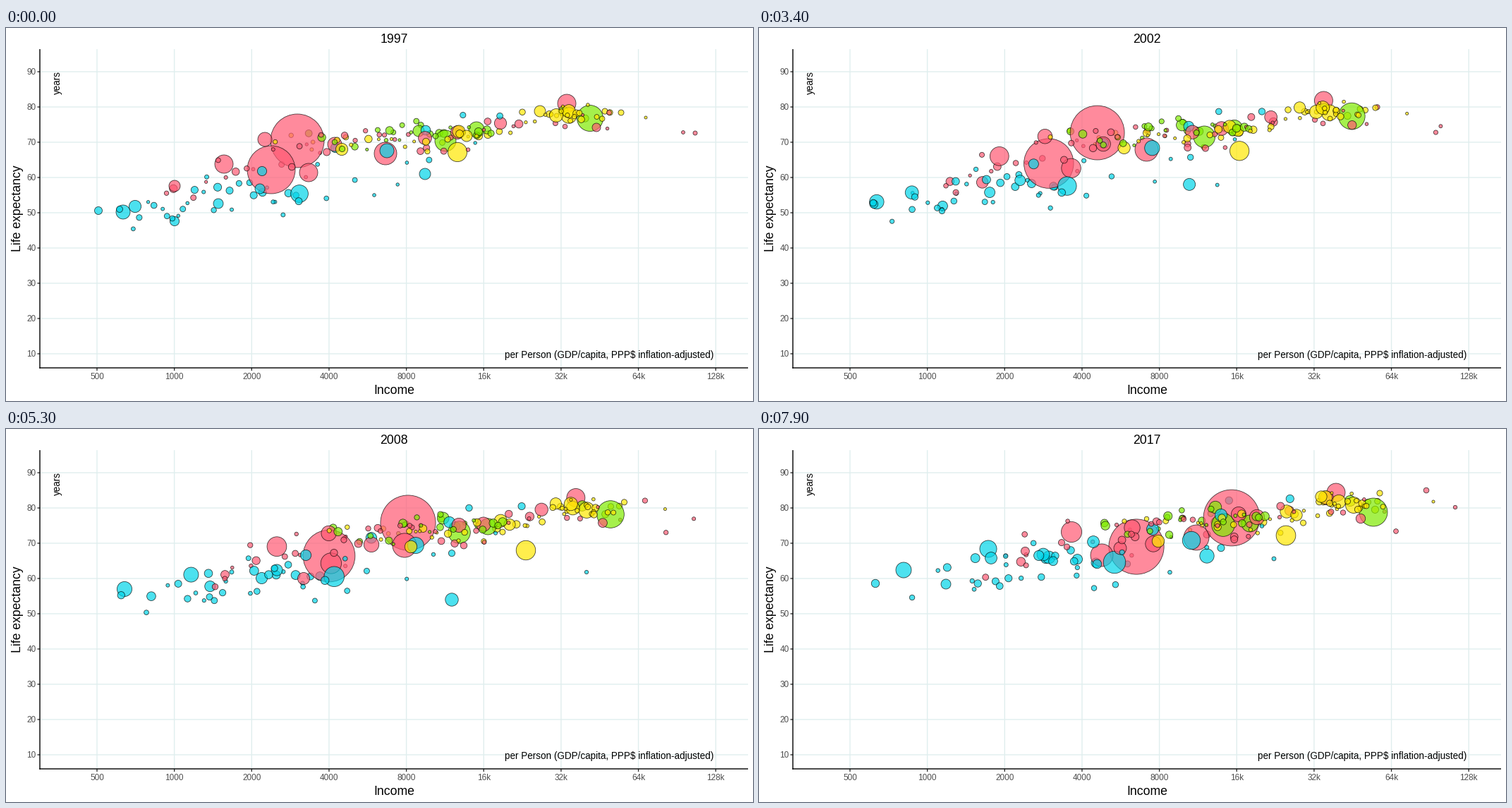
Recreate the animation shown at these times as a matplotlib script. Size 1059x529 px, loop 10000 ms.

```python
import matplotlib.pyplot as plt
import numpy as np
from matplotlib.animation import FuncAnimation
from matplotlib.patches import Circle

W, H, DPI = 1059, 529, 100
FRAMES, HOLD, STEPS, MID = 100, 20, 59, 33
PX = 72 / DPI
CYAN, GREEN, RED, YELLOW = "#00d5e9", "#7feb00", "#ff5872", "#ffe700"
GROWTH = {CYAN: 1.27, GREEN: 1.09, RED: 1.12, YELLOW: 1.02}

rng = np.random.default_rng(7)
plt.rcParams["font.family"] = "Liberation Sans"
fig = plt.figure(figsize=(W / DPI, H / DPI), dpi=DPI, facecolor="white")
ax = fig.add_axes([0, 0, 1, 1])
ax.set(xlim=(0, W), ylim=(H, 0))
ax.axis("off")


def line(xs, ys, color, z, width=1.4):
    ax.plot(xs, ys, color=color, lw=width * PX, zorder=z,
            solid_capstyle="butt", snap=False)


def label(x, y, s, size, color="black", ha="center", rot=0):
    return ax.text(x, y, s, fontsize=size * PX, color=color, ha=ha, va="baseline",
                   rotation=rot, rotation_mode="anchor", zorder=9)


def draw_axes():
    names = ("500", "1000", "2000", "4000", "8000", "16k", "32k", "64k", "128k")
    for i, name in enumerate(names):
        x = 129 + 109.65 * i
        line((x, x), (30, 482), "#e0eeee", 1)
        line((x, x), (482, 486), "#333333", 2)
        label(x, 498.5, name, 11.8, "#4d4d4d")
    for v in range(10, 100, 10):
        y = 512 - 5 * v
        line((48, 1052), (y, y), "#e0eeee", 1)
        line((44.5, 48), (y, y), "#333333", 2)
        label(42.5, y + 4.5, str(v), 11.8, "#4d4d4d", "right")
    line((48, 48), (30, 482.8), "black", 3)
    line((47.3, 1052), (482, 482), "black", 3)
    label(550, 519, "Income", 17.6)
    label(21, 256, "Life expectancy", 17.6, rot=90)
    label(77, 78, "years", 13.56, rot=90)
    label(1003, 468, "per Person (GDP/capita, PPP$ inflation-adjusted)", 13.56, ha="right")


bubbles = []


def bubble(color, r, start, end, mid=None, growth=None, sway=0, z=5):
    """Add one bubble going from start to end, through mid if it is given."""
    dot = Circle(start, r, fc=color + "b3", ec=(0, 0, 0, 0.75), lw=0.8 * PX, zorder=z)
    ax.add_patch(dot)
    way = np.array([start, mid, end] if mid else [start, end])
    knots = (0, MID, STEPS) if mid else (0, STEPS)
    bubbles.append((dot, knots, way, r, growth or GROWTH[color], sway, rng.integers(2, 6)))


def swarm(color, count, xs, ys, spread, travel, rise, rmax):
    """Scatter small bubbles along the line xs, ys; poorer ones travel further."""
    u = (np.arange(count) + rng.random(count)) / count
    for x in np.interp(u, np.linspace(0, 1, len(xs)), xs):
        y = np.interp(x, xs, ys) + rng.normal(0, spread)
        dx = travel * (1 - x / 1000) * rng.uniform(0.4, 1.6)
        dy = rise * rng.uniform(0.8, 1.2)
        r = 2 + (rmax - 2) * rng.random() ** 1.3
        bubble(color, r, (x, y), (x + dx, y - dy),
               sway=rng.uniform(-4, 4), z=rng.uniform(4.6, 6))


def add_swarms():
    swarm(CYAN, 28, (180, 240, 300, 365, 420), (272, 258, 235, 228, 238), 17, 95, 48, 6)
    swarm(CYAN, 9, (400, 540, 610, 730), (215, 230, 180, 150), 18, 110, 22, 5)
    swarm(RED, 14, (216, 300, 370, 450), (240, 205, 200, 195), 14, 140, 35, 6)
    swarm(RED, 24, (400, 500, 590, 700, 860), (175, 158, 165, 140, 128), 12, 150, 22, 6)
    swarm(GREEN, 27, (415, 530, 580, 640, 690), (165, 158, 140, 145, 147), 9, 120, 20, 6)
    swarm(YELLOW, 22, (380, 480, 570, 640, 700), (168, 160, 162, 158, 148), 7, 260, 26, 5.5)
    swarm(YELLOW, 22, (715, 770, 800, 820, 860), (135, 122, 122, 123, 118), 6, 190, 17, 5)


def add_giants():
    bubble(RED, 13, (309, 193), (443, 146), growth=1.12)
    bubble(RED, 38, (413, 160), (670, 126), (570, 133), growth=1.05)
    bubble(RED, 34, (376, 201), (535, 167), (458, 180), growth=1.15)
    bubble(RED, 16, (538, 178), (620, 154), (565, 165))
    bubble(RED, 13, (795, 107), (818, 90), growth=1)
    bubble(RED, 13, (429, 205), (486, 179), growth=1.23)
    bubble(GREEN, 18.5, (828, 128), (871, 118), (857, 121), growth=1.08)
    bubble(GREEN, 15, (623, 160), (658, 136))
    bubble(GREEN, 11, (667, 144), (696, 134))
    bubble(GREEN, 8, (585, 146), (647, 111))
    bubble(GREEN, 7, (790, 118), (838, 102))
    bubble(YELLOW, 13.6, (640, 176), (747, 151), (737, 172))


def add_large():
    bubble(CYAN, 10, (540, 174), (613, 158))
    bubble(CYAN, 10, (166, 261), (205, 200), (168, 227), growth=1.1)
    bubble(CYAN, 8.6, (183, 253), (325, 170), growth=1.4)
    bubble(CYAN, 12.4, (416, 235), (504, 189))
    bubble(CYAN, 8, (594, 207), (635, 180), (632, 242))
    bubble(CYAN, 7, (301, 249), (411, 182))
    bubble(CYAN, 7, (360, 228), (403, 178))
    bubble(CYAN, 6.6, (363, 203), (474, 160))
    bubble(CYAN, 6.6, (239, 274), (329, 183))
    bubble(CYAN, 6.7, (467, 170), (558, 142))
    bubble(CYAN, 6.8, (595, 145), (655, 122))
    bubble(CYAN, 5.5, (131, 259), (265, 220))
    bubble(CYAN, 4.5, (161, 257), (165, 219))
    bubble(CYAN, 2.3, (522, 237), (730, 184), (823, 203))
    bubble(RED, 10, (466, 165), (559, 163))
    bubble(RED, 9.5, (640, 148), (706, 125))
    bubble(RED, 9.4, (594, 156), (680, 121))
    bubble(RED, 10, (367, 158), (529, 140))
    bubble(RED, 8.6, (701, 135), (805, 98))
    bubble(RED, 8, (239, 224), (512, 169), (422, 212))
    bubble(RED, 6, (837, 141), (853, 127))
    bubble(RED, 3, (977, 149), (903, 145))
    bubble(RED, 2.4, (960, 148), (987, 111))
    bubble(RED, 3.4, (855, 120), (946, 87))
    bubble(YELLOW, 11.2, (798, 124), (843, 108))
    bubble(YELLOW, 9.5, (780, 124), (822, 103))
    bubble(YELLOW, 9.4, (798, 118), (803, 97))
    bubble(YELLOW, 9, (642, 147), (748, 117))
    bubble(YELLOW, 8.6, (476, 172), (566, 159), (574, 167))
    bubble(YELLOW, 8, (653, 153), (762, 122))
    bubble(YELLOW, 8, (757, 118), (797, 96))
    bubble(YELLOW, 4, (872, 120), (880, 91))
    bubble(YELLOW, 2, (907, 127), (956, 103))


draw_axes()
add_giants()
add_large()
add_swarms()
title = label(550, 21, "1997", 17.6)


def update(i):
    k = min(max(i - HOLD, 0), STEPS)
    t = k / STEPS
    for dot, knots, way, r, growth, sway, waves in bubbles:
        wave = sway * np.sin(np.pi * waves * t)
        dot.center = (np.interp(k, knots, way[:, 0]) + wave,
                      np.interp(k, knots, way[:, 1]) - wave / 2)
        dot.radius = r * (1 + (growth - 1) * t)
    title.set_text(str(round(1997 + 20 * t)))


anim = FuncAnimation(fig, update, frames=FRAMES, interval=100, repeat=True,
                     repeat_delay=0, init_func=lambda: update(0))
plt.show()
```
